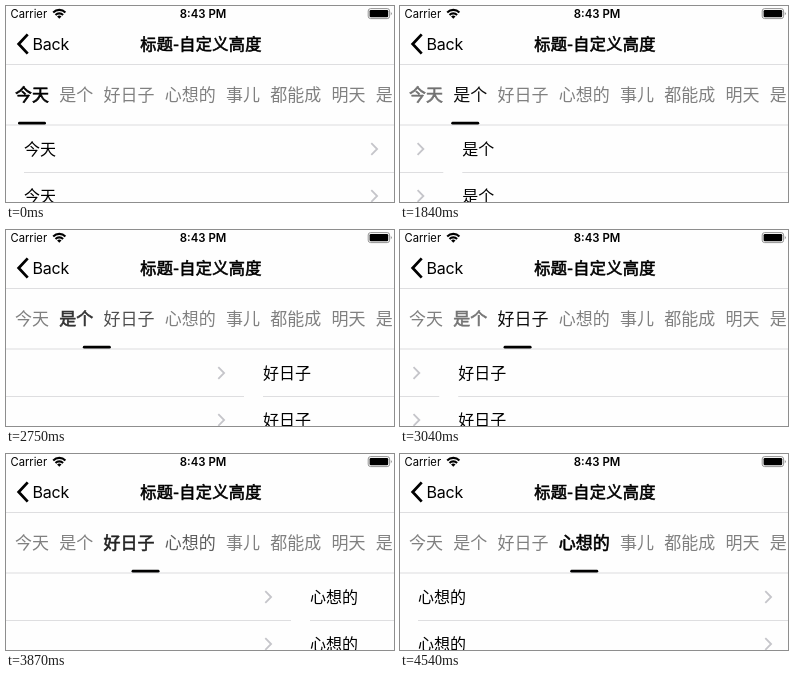
Write an HTML page that moves like this. It is 388 px wide and 196 px high and loops after 5530 ms.

```html
<!DOCTYPE html>
<html lang="zh-CN">
<head>
<meta charset="utf-8">
<title>标题-自定义高度</title>
<style>
  html, body { margin: 0; width: 100%; height: 100%; overflow: hidden; background: #fefefe; }
  svg { display: block; width: 388px; height: 196px; }
  text { font-family: "Noto Sans CJK SC", "Noto Sans CJK", sans-serif; }
  .latin { font-family: Inter, Roboto, sans-serif; }
  .status { font-size: 11.2px; }
  .time { font-size: 11.4px; font-weight: 600; }
  .back { font-size: 16px; letter-spacing: -0.25px; }
  /* a thin outline gives a semibold between regular and bold */
  .title { font-size: 16.2px; letter-spacing: 0.3px; stroke: #000; stroke-width: 0.6; }
  .tab { font-size: 17px; }
  .row { font-size: 16px; }
  .line { fill: none; stroke: #000; }
  .chevron { fill: none; stroke: #c5c5ca; stroke-width: 1.8; }
  .rule { fill: #dedee0; }
</style>
</head>
<body>
<svg viewBox="0 0 388 196">
  <g id="track"></g>

  <text class="latin status" x="4.5" y="12">Carrier</text>
  <path class="line" stroke-width="2.1" d="M47.2 6.4a8.7 8.7 0 0 1 12.2 0M49.5 8.9a5.4 5.4 0 0 1 7.6 0"/>
  <path d="M53.3 12.8l-2.2-2.3a3.1 3.1 0 0 1 4.4 0z"/>
  <text class="latin time" x="197" y="12" text-anchor="middle">8:43 PM</text>
  <rect x="362.2" y="2.6" width="21.4" height="10" rx="2.4" fill="none" stroke="#888" stroke-width="0.9"/>
  <rect x="363.6" y="4" width="18.6" height="7.2" rx="1.2"/>
  <path d="M384.8 6a1.8 1.8 0 0 1 0 3.2z" fill="#888"/>

  <path class="line" stroke-width="2.8" d="M21.7 28.4L12.7 38l9 9.6"/>
  <text class="latin back" x="26.6" y="43.7">Back</text>
  <text class="title" x="195" y="44.3" text-anchor="middle">标题-自定义高度</text>
  <rect class="rule" y="58" width="388" height="1"/>

  <g id="tabs"></g>
  <rect class="rule" y="118.5" width="388" height="1"/>
  <rect id="bar" y="115.8" width="28" height="2.8" rx="1.4"/>
</svg>
<script>
const LOOP = 5530, PITCH = 392, RULE_END = 391, GREY = 128, LEAD = 45;
const names = ["今天", "是个", "好日子", "心想的", "事儿", "都能成", "明天", "是"];

// Step times of each swipe: finger drag (first to hold), then spring to the next page.
const swipes = [
  { drag: [1290, 1340, 1380, 1430], first: 13, hold: 60, tau: 52.5,
    snap: [1700, 1740, 1790, 1840, 1870, 1920, 1960, 2000, 2050, 2090] },
  { drag: [2570, 2630, 2690, 2750], first: 13, hold: 153, tau: 45,
    snap: [2920, 2970, 3020, 3070, 3130, 3180, 3230, 3280] },
  { drag: [3810, 3870, 3930], first: 42, hold: 170, tau: 41.8,
    snap: [4220, 4280, 4320, 4370, 4410, 4450, 4500, 4540] }
];

function add(parent, tag, attrs, text) {
  const el = document.createElementNS("http://www.w3.org/2000/svg", tag);
  for (const key in attrs) el.setAttribute(key, attrs[key]);
  if (text) el.textContent = text;
  return parent.appendChild(el);
}

const track = document.getElementById("track");
const tabBox = document.getElementById("tabs");
const bar = document.getElementById("bar");

const tabs = [], centers = [];
let tabX = 9;
for (const name of names) {
  const width = 17 * name.length;
  tabs.push(add(tabBox, "text", { class: "tab", x: tabX, y: 95.4 }, name));
  centers.push(tabX + width / 2);
  tabX += width + 10.25;
}

for (let i = 0; i < 4; i++) {
  const page = add(track, "g", { transform: `translate(${i * PITCH} 0)` });
  for (const y of [0, 47]) {
    add(page, "text", { class: "row", x: 18, y: 149 + y }, names[i]);
    add(page, "path", { class: "chevron", d: `M365.3 ${137.2 + y}l5.8 5.8l-5.8 5.8` });
    add(page, "rect", { class: "rule", x: 18, y: 166 + y, width: RULE_END - 18, height: 1 });
  }
}

const lastStep = (steps, t) => steps.filter(s => s <= t).length - 1;

function offset(s, t) {
  const k = lastStep(s.snap, t);
  if (k < 0) {
    const d = lastStep(s.drag, t);
    return s.first + (s.hold - s.first) * d / (s.drag.length - 1);
  }
  const x = (s.snap[k] - s.snap[0] + LEAD) / s.tau;
  return PITCH - (PITCH - s.hold) * (1 + x) * Math.exp(-x);
}

function draw(t) {
  const page = swipes.filter(s => t >= s.snap[s.snap.length - 1]).length;
  const swipe = swipes[page];
  const dx = swipe && t >= swipe.drag[0] ? offset(swipe, t) : 0;
  const part = dx / PITCH;

  track.setAttribute("transform", `translate(${-(page * PITCH + dx)} 0)`);
  bar.setAttribute("x", centers[page] + (centers[page + 1] - centers[page]) * part - 14);
  tabs.forEach((tab, i) => {
    const active = i === page ? 1 - part : i === page + 1 ? part : 0;
    const v = Math.round(GREY * (1 - active));
    const color = `rgb(${v},${v},${v})`;
    tab.setAttribute("fill", color);
    tab.setAttribute("stroke", color);
    tab.setAttribute("stroke-width", i === page ? 0.6 : 0);
  });
}

const start = performance.now();
function tick() {
  draw((performance.now() - start) % LOOP);
  requestAnimationFrame(tick);
}
tick();
</script>
</body>
</html>
```
